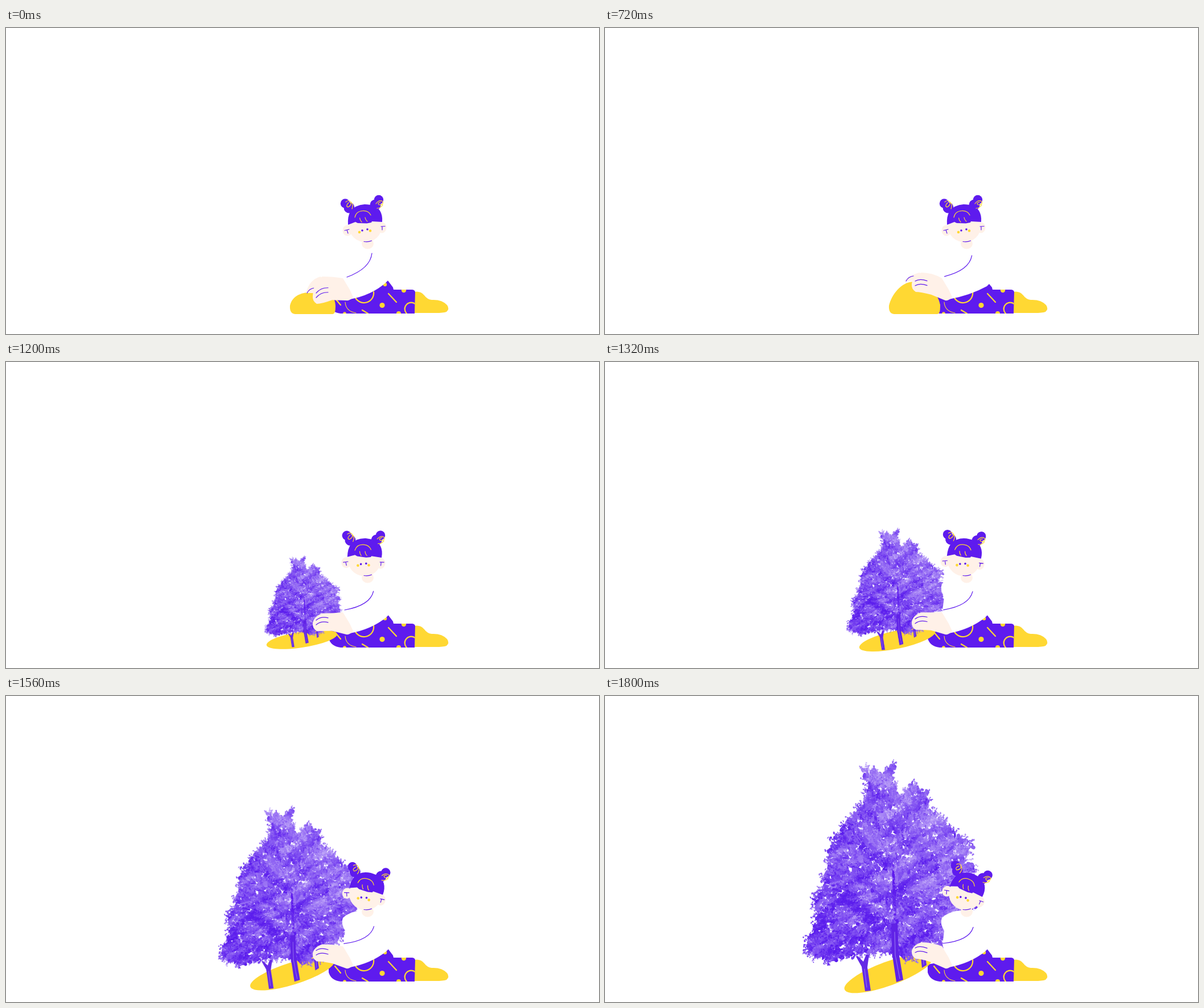
These frames come from a looping animation (1042 by 538 pixels, 3800 ms). An HTML page with a canvas:

```html
<!DOCTYPE html>
<html lang="en">
<head>
<meta charset="utf-8">
<title>Growing a forest</title>
<style>
html, body { margin: 0; width: 100%; height: 100%; overflow: hidden; background: #fff; }
canvas { display: block; }
</style>
</head>
<body>
<canvas id="stage" width="1042" height="538"></canvas>
<script>
const LOOP = 3800, STEP = 120, LAST = 15, REVEAL = 8;
const PURPLE = '#5e1bee', YELLOW = '#ffd833', SKIN = '#fff1e8';
const ctx = document.getElementById('stage').getContext('2d');
ctx.imageSmoothingQuality = 'high';

const clamp = (v, lo, hi) => Math.max(lo, Math.min(hi, v));
const rad = deg => deg * Math.PI / 180;

// Value at step k, given its values at the start, full press, release and end.
function pose(k, ...values) {
  const steps = [0, 6, 10, LAST];
  const i = k < 6 ? 0 : k < 10 ? 1 : 2;
  return values[i] + (values[i + 1] - values[i]) * (k - steps[i]) / (steps[i + 1] - steps[i]);
}

function fill(d, color, g = ctx) {
  g.fillStyle = color;
  g.fill(new Path2D(d));
}

function line(d, color, width = 1.2, g = ctx) {
  g.strokeStyle = color;
  g.lineWidth = width;
  g.lineCap = g.lineJoin = 'round';
  g.stroke(new Path2D(d));
}

function oval(x, y, rx, ry, color, turn = 0, g = ctx) {
  g.fillStyle = color;
  g.beginPath();
  g.ellipse(x, y, rx, ry, turn, 0, 7);
  g.fill();
}

const dot = (x, y, r, color) => oval(x, y, r, r, color);

// The full-grown trees, drawn once on a layer of their own.
function growTree() {
  const layer = document.createElement('canvas');
  layer.width = 700;
  layer.height = 538;
  const g = layer.getContext('2d');
  let seed = 7;
  const rand = () => (seed = seed * 16807 % 2147483647) / 2147483647;
  const spread = r => (rand() + rand() - 1) * r;
  const crown = new Path2D(`M512 114 L500 128 L486 138 L468 128 L452 130 L462 152 L454 192 L424 222
    L394 264 L394 300 L370 357 L372 395 L357 430 L358 455 L400 464 L455 452 L505 448 L535 464 L585 448
    L600 415 L652 370 L640 320 L646 300 L630 285 L646 264 L600 226 L565 195 L568 168 L538 155 L522 180 L506 152Z`);

  function tone(x, y) {
    const clump = Math.sin(x / 15 + Math.sin(y / 17) * 2) + Math.sin(y / 9 + Math.sin(x / 21) * 3)
      + Math.sin((x + y * 2) / 8);
    const light = 2 + clump * 0.6 + (320 - y) / 240 + (x - 505) / 200 + spread(1.8);
    return `hsl(258 85% ${52 + 6 * clamp(light, 0, 5.5)}%)`;
  }

  // Sprigs of leaves that point away from the heart of the crown.
  function sprigs(count, length, size) {
    while (count) {
      let x = 350 + rand() * 310, y = 108 + rand() * 360;
      if (!g.isPointInPath(crown, x, y)) continue;
      count--;
      const color = tone(x, y), turn = Math.atan2(y - 340, x - 505) + spread(1.3);
      for (let i = 0; i < length; i++) {
        oval(x + spread(2), y + spread(2), size * (0.6 + rand() * 0.7), size * (0.4 + rand() * 0.5), color, rand() * 3, g);
        x += Math.cos(turn) * 1.9;
        y += Math.sin(turn) * 1.9;
      }
    }
  }

  sprigs(4500, 1, 4.2);
  line('M508 455 Q512 400 506 300 M509 420 L485 385 M511 400 L540 365', PURPLE, 5, g);
  g.globalAlpha = 0.8;
  sprigs(2300, 7, 1.7);
  g.globalAlpha = 1;
  fill('M457 519 L451 476 L441 458 L444 457 L454 467 L459 454 L464 455 L461 477 L467 518Z', '#6429e6', g);
  fill('M512 503 L504 450 L503 400 L514 400 L516 450 L524 499Z', '#6022e6', g);
  fill('M557 478 L554 450 L562 450 L565 473Z', '#6429e6', g);
  line('M460 512 L456 480 M518 497 L510 455 L509 415 M560 472 L559 455', '#9270ee', 1.2, g);
  return layer;
}

const tree = growTree();

function drawLegs(tipX, tipY) {
  fill('M718 464 Q728 462 735 470 Q740 477 748 478 Q766 477 775 487 Q780 494 774 499 Q768 501 755 501 L718 501Z', YELLOW);
  const pants = new Path2D(`M567 472 L567 486 Q571 500 588 502 L718 502 L719 464 Q718 460 713 460
    L681 460 L680 456 L${tipX} ${tipY} L640 450 L600 466 Z`);
  ctx.save();
  ctx.clip(pants);
  ctx.fillStyle = PURPLE;
  ctx.fillRect(560, 430, 170, 80);
  line('M612 468 A16.5 16.5 0 0 0 646 464 M578 475 L588 487 M672 467 L686 482 M626 496 L636 502', YELLOW, 2.2);
  line('M720 486 A9.5 9.5 0 1 0 704 502', YELLOW, 2.2);
  line('M596 482 Q597 498 615 501', YELLOW, 1.1);
  dot(661, 487.5, 4.6, YELLOW);
  dot(699, 461, 4.2, YELLOW);
  dot(690, 502, 4, YELLOW);
  dot(595, 502, 2.8, YELLOW);
  dot(666, 451, 3.2, YELLOW);
  ctx.restore();
}

function drawMound(press) {
  const top = 464 - 18 * press, right = 579 + 10 * press;
  fill(`M508 503 Q498 502 499 488 C503 470 520 ${top} 543 ${top}
    C568 ${top} ${right} 472 ${right} 490 Q${right} 503 ${right - 5} 503Z`, YELLOW);
}

function drawIsland(k) {
  const size = Math.min(1, (k - 7) * 0.132);
  const rest = (1 - size) ** 1.35;
  oval(498 + 43 * rest, 488, 82 - 38 * rest, 21 - 14 * rest, YELLOW, rad(22 * rest - 20));
  ctx.save();
  ctx.translate(353 + 205 * rest, 520 - 36 * rest);
  ctx.scale(size ** 0.89, size);
  ctx.drawImage(tree, -353, -520);
  ctx.restore();
}

function drawShirt(k, tipX, tipY) {
  fill(`M625 377 Q603 379 592 390 Q588 400 596 413 L593 437 L604 477
    Q642 470 ${tipX - 4} ${tipY + 4} L${tipX} ${tipY} L680 430 Q680 386 664 382 L646 376Z`, '#fff');
  line(`M${643 + 0.27 * k} ${396 + 0.7 * k} Q640 ${423 + 0.5 * k} ${599 - 0.4 * k} ${438 - 0.2 * k}`, PURPLE);
}

function drawHead(k) {
  oval(635.5, 379, 10.5, 9.5, SKIN);
  ctx.save();
  ctx.translate(pose(k, 632, 632, 630, 632), 352);
  ctx.rotate(rad(Math.max(0, (k - 8.25) * 3.4)));
  ctx.translate(-632, -352);
  oval(600, 356, 8.5, 9.5, SKIN);
  oval(660.5, 351, 8, 9.5, SKIN);
  oval(631.5, 348, 29, 28.5, SKIN);
  dot(596, 308.5, 8.2, PURPLE);
  dot(603, 316, 9.5, PURPLE);
  dot(655, 302, 8.2, PURPLE);
  dot(649, 311, 9.5, PURPLE);
  fill('M601 346 Q600 331 605 323 Q613 311 630 310 Q649 310 657 321 Q662 329 661 341 L643 340 L642 342 L634 343.5 L618 343 L614 341Z', PURPLE);
  line('M613 333 Q615 322 627 321.5 Q637 321 641 329 M621.5 334 Q622 338 625 341 M631 333 Q632 338 635 340', YELLOW);
  line('M597 306 Q602 301 606 306 Q607 312 601 315 Q596 313 602 307 M606 306 Q611 310 608 318', YELLOW);
  line('M650 309 Q656 301 662 305 Q664 311 656 311 Q651 308 658 306 M652 317 Q658 317 662 311', YELLOW);
  line('M595 356 L603 354 M599 355 L601 361 M659 349 L666 348.5 M661 349 L661 355', PURPLE);
  dot(626, 356, 1.8, PURPLE);
  dot(635, 354, 1.8, PURPLE);
  dot(621, 359, 2.3, YELLOW);
  dot(640, 356.5, 2.3, YELLOW);
  ctx.restore();
  line('M629 375.5 Q637 376.5 642.5 374', PURPLE);
}

function drawHand(k) {
  const top = pose(k, 437, 430, 442, 433), low = pose(k, 485, 464, 473, 462);
  const knuckle = low - 19, rise = (463 - low) * 0.42;
  if (k < REVEAL) {
    fill(`M527 ${knuckle} Q533 ${top + 5} 553 ${top} L560 ${knuckle}Z`, SKIN);
    line(`M529 ${knuckle} q4 -8 13 -9`, PURPLE);
  }
  fill(`M539 ${low - 14} Q541 ${top + 5} 556 ${top} Q575 ${top} 592 440 L604 460 L610 473 Q604 480 598 479
    L573 ${low * 0.45 + 260} Q555 ${low} 546 ${low} Q538 ${low - 5} 539 ${low - 14}Z`, SKIN);
  for (const y of [knuckle, knuckle + 8]) line(`M545 ${y} q8 ${rise / 2 - 5} 21 ${rise}`, PURPLE);
}

function draw(time) {
  const k = Math.min(LAST, Math.floor(time % LOOP / STEP));
  const press = pose(k, 0, 1, 0.2, 0.2);
  const tipX = 671 + 4 * press, tipY = 444 + 6 * press;
  ctx.fillStyle = '#fff';
  ctx.fillRect(0, 0, 1042, 538);
  drawLegs(tipX, tipY);
  if (k < REVEAL) drawMound(press);
  else drawIsland(k);
  drawShirt(k, tipX, tipY);
  drawHead(k);
  drawHand(k);
}

const start = performance.now();
function tick() {
  draw(performance.now() - start);
  requestAnimationFrame(tick);
}
tick();
</script>
</body>
</html>
```
